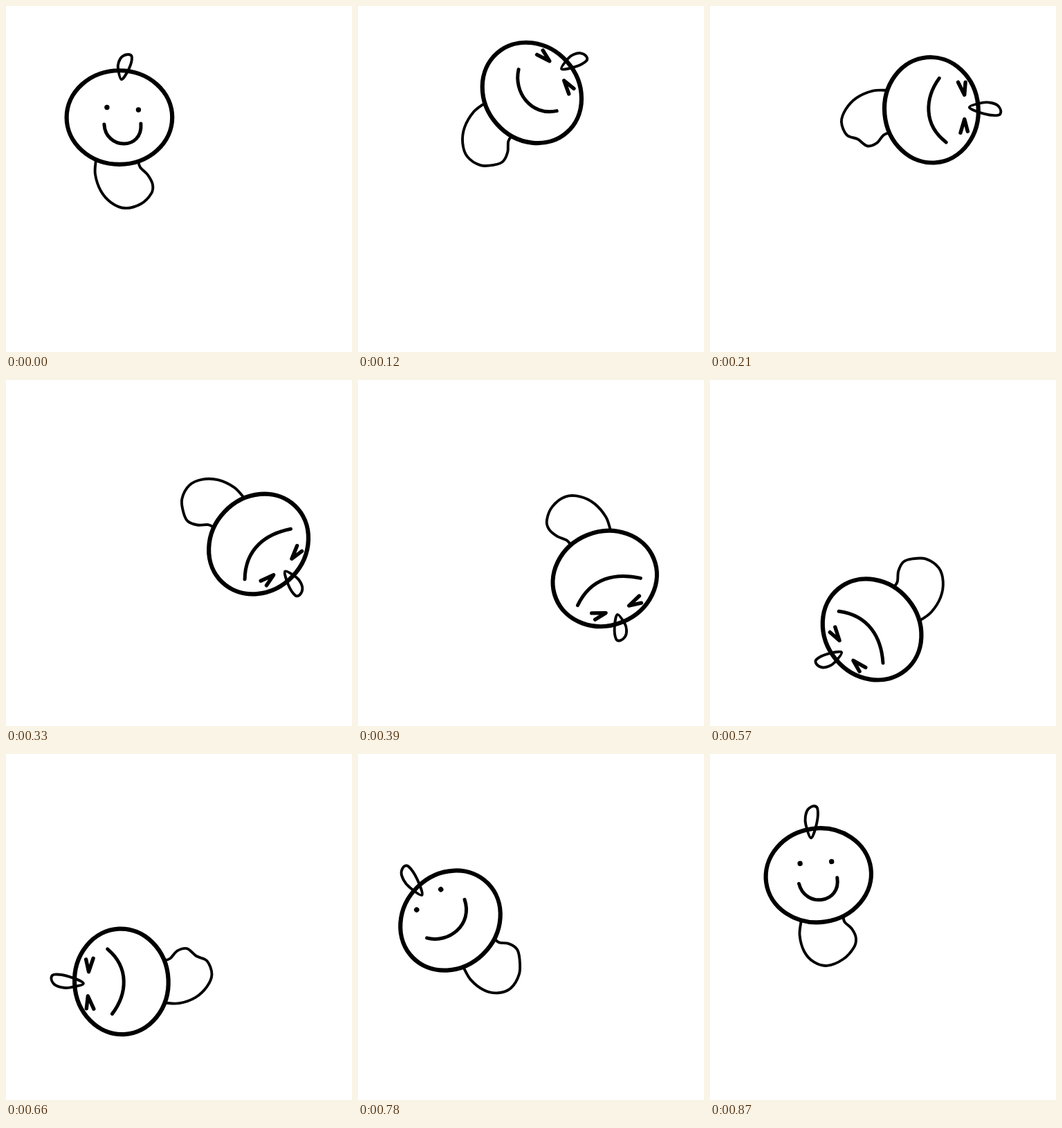
An HTML page with a canvas for the animation above (900 ms loop, 500x500 px).

```html
<!DOCTYPE html>
<html lang="en">
<head>
<meta charset="utf-8">
<title>Tumbling doodle</title>
<style>
  html, body { margin: 0; width: 100%; height: 100%; overflow: hidden; background: #fff; }
  canvas { display: block; }
</style>
</head>
<body>
<canvas id="stage" width="500" height="500"></canvas>
<script>
const ctx = document.getElementById("stage").getContext("2d");
const LOOP = 900, STEP = 30, TURN = 0.4046; // ms, ms, degrees per ms
const DEG = Math.PI / 180;

// Outlines as x, y pairs around the centre of the head.
const BODY = [-34, 62, -35, 82, -27, 106, -12, 123, 8, 131, 31, 125, 46, 110, 48, 97, 41, 83, 30, 72, 27, 62];
const HAIR = [3, -55, -2, -71, -1, -80, 4, -88, 13, -91, 18, -87, 14, -71];
const SMILE = [-22, 10, -20, 47, 34, 48, 31, 9];
const GRIMACE = [-48, -19, -18, 2, 18, 9, 51, -21];
const EYES = [-18, -14.5, 27.5, -11];

const mix = (a, b, k) => a + (b - a) * k;

function smooth(from, to, t) {
  const k = Math.min(1, Math.max(0, (t - from) / (to - from)));
  return k * k * (3 - 2 * k);
}

function mapPoints(flat, change) {
  const points = [];
  for (let i = 0; i < flat.length; i += 2) points.push(change(flat[i], flat[i + 1]));
  return points;
}

function stroke(width) {
  ctx.lineWidth = width;
  ctx.stroke();
}

// Smooth curve through the points.
function curve(points, closed) {
  const n = points.length;
  const at = i => points[closed ? (i + n) % n : Math.max(0, Math.min(n - 1, i))];
  ctx.beginPath();
  ctx.moveTo(...at(0));
  for (let i = 0; i < (closed ? n : n - 1); i++) {
    const [a, b, c, d] = [at(i - 1), at(i), at(i + 1), at(i + 2)];
    ctx.bezierCurveTo(b[0] + (c[0] - a[0]) / 6, b[1] + (c[1] - a[1]) / 6,
      c[0] - (d[0] - b[0]) / 6, c[1] - (d[1] - b[1]) / 6, c[0], c[1]);
  }
  if (closed) ctx.closePath();
}

function drawBody(squeeze, late) {
  curve(mapPoints(BODY, (x, y) => {
    const dent = x > 0 ? 14 * squeeze * Math.exp(-(((y - 112) / 14) ** 2)) : 0;
    return [x - dent - late * 13 * (y - 62) / 65, y];
  }));
  stroke(3.9);
}

function drawHead() {
  ctx.beginPath();
  ctx.ellipse(0, 0, 76.3, 67.8, 0, 0, 2 * Math.PI);
  ctx.fill();
  stroke(6.2);
}

function drawHair(squeeze, late) {
  const length = 1 + 0.25 * (squeeze + late);
  curve(mapPoints(HAIR, (x, y) => [x - 6 * late - 2 * squeeze, -55 + (y + 55) * length]), true);
  stroke(3.9);
}

function drawMouth(strain) {
  const mouth = SMILE.map((v, i) => mix(v, GRIMACE[i], strain));
  ctx.beginPath();
  ctx.moveTo(mouth[0], mouth[1]);
  ctx.bezierCurveTo(...mouth.slice(2));
  stroke(5);
}

function drawSquint() {
  for (const side of [-1, 1]) {
    const y = 1.5 * side;
    ctx.beginPath();
    ctx.moveTo(side * 36.5, y - 40.5);
    ctx.lineTo(side * 17.5, y - 48);
    ctx.lineTo(side * 35.5, y - 51);
    stroke(5.4);
  }
}

function drawDots(strain) {
  const lift = 34 * (1 - (1 - strain) ** 3);
  ctx.fillStyle = "#000";
  for (const [x, y] of mapPoints(EYES, (x, y) => [x, y - lift])) {
    ctx.beginPath();
    ctx.arc(x, y, 3.7, 0, 2 * Math.PI);
    ctx.fill();
  }
}

function draw(t) {
  const phase = 2 * Math.PI * t / LOOP;
  const strain = 1 - (1 - Math.sin(Math.PI * t / 880)) ** 1.8; // smile to grimace and back
  const squeeze = Math.sin(phase) ** 4;                        // while lying on a side
  const late = smooth(620, 790, t);                            // swing before landing

  ctx.fillStyle = "#fff";
  ctx.fillRect(0, 0, 500, 500);
  ctx.save();
  ctx.lineCap = ctx.lineJoin = "round";
  ctx.translate(247, 243);
  ctx.rotate(t * TURN * DEG);
  const radius = 116.7 + 1.5 * strain - 4 * late;
  const angle = (224.6 - 1.4 * Math.sin(phase)) * DEG;
  ctx.translate(radius * Math.cos(angle), radius * Math.sin(angle));

  drawBody(squeeze, late);
  drawHead();
  drawHair(squeeze, late);
  ctx.translate(-6 * late, 0);
  drawMouth(strain);
  if (t > 105 && t < 735) drawSquint();
  else drawDots(strain);
  ctx.restore();
}

function tick() {
  const t = performance.now() % LOOP;
  draw(Math.floor(t / STEP) * STEP);
  requestAnimationFrame(tick);
}
tick();
</script>
</body>
</html>
```
